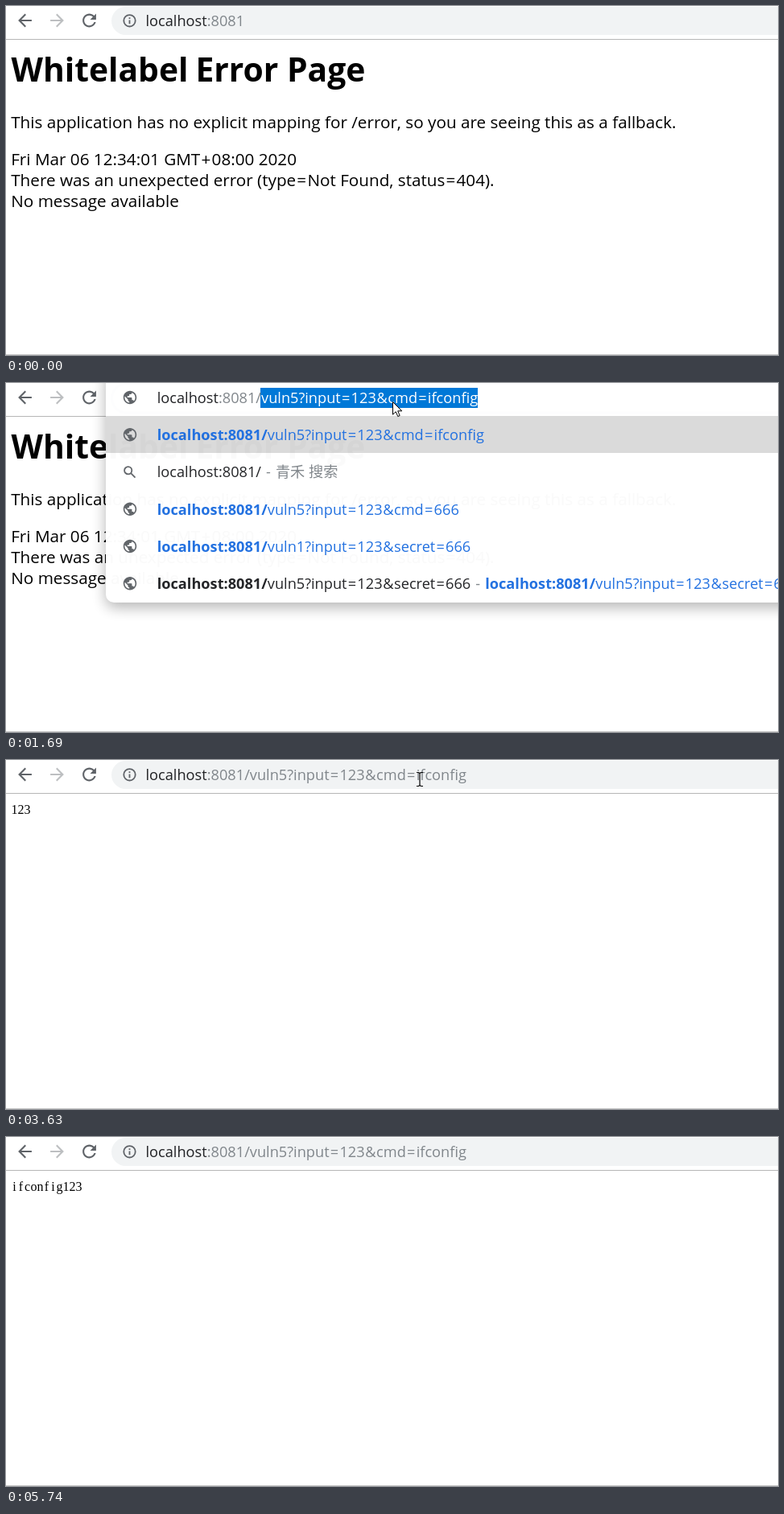
These frames come from a looping animation (959x434 px, 6430 ms). An HTML page:

```html
<!DOCTYPE html>
<html lang="en">
<head>
<meta charset="utf-8">
<title>Browser reload</title>
<style>
  html, body { margin: 0; width: 100%; height: 100%; overflow: hidden; background: #fff; }
  svg { display: block; width: 959px; height: 434px; font-family: "Open Sans", "Noto Sans CJK SC", "Noto Sans CJK", sans-serif; }
  .body { font-size: 20.68px; }
  .bar { font-size: 18.2px; }
  .plain { font: 16px "Liberation Serif", serif; text-anchor: middle; }
  .shade { filter: drop-shadow(0 6px 9px rgba(0, 0, 0, .3)); }
</style>
</head>
<body>
<svg id="stage" viewBox="0 0 959 434">
  <defs>
    <path id="back" d="M20 11H7.83l5.59-5.59L12 4l-8 8 8 8 1.41-1.41L7.83 13H20v-2z"/>
    <path id="reload" d="M17.65 6.35C16.2 4.9 14.21 4 12 4c-4.42 0-7.99 3.58-7.99 8s3.57 8 7.99 8c3.73 0 6.84-2.55 7.73-6h-2.08c-.82 2.33-3.04 4-5.65 4-3.31 0-6-2.69-6-6s2.69-6 6-6c1.66 0 3.14.69 4.22 1.78L13 11h7V4l-2.35 2.35z"/>
    <path id="stop" d="M5 5L19 19M19 5L5 19" fill="none" stroke="#5f6368" stroke-width="1.9"/>
    <path id="globe" d="M12 2C6.48 2 2 6.48 2 12s4.48 10 10 10 10-4.48 10-10S17.52 2 12 2zm-1 17.93c-3.95-.49-7-3.85-7-7.93 0-.62.08-1.21.21-1.79L9 15v1c0 1.1.9 2 2 2v1.93zm6.9-2.54c-.26-.81-1-1.39-1.9-1.39h-1v-3c0-.55-.45-1-1-1H8v-2h2c.55 0 1-.45 1-1V7h2c1.1 0 2-.9 2-2v-.41c2.93 1.19 5 4.06 5 7.41 0 2.08-.8 3.97-2.1 5.39z"/>
    <g id="info" fill="none" stroke="#5f6368" stroke-width="1.8">
      <circle r="7.2"/><path d="M0-.8V4M0-4V-2.2"/>
    </g>
    <g id="lens" fill="none" stroke="#5f6368" stroke-width="1.8">
      <circle cx="-1.8" cy="-1.8" r="4.6"/><path d="M1.6 1.6L7 7"/>
    </g>
    <path id="arrow" d="M.5.5V16.2L4.2 12.7L6.8 18.6L9.2 17.5L6.7 11.8H11.8Z" fill="#fff" stroke="#000"/>
    <path id="beam" d="M-4-8.5H-1.5L0-7.5L1.5-8.5H4M0-7.5V7.5M-4 8.5H-1.5L0 7.5L1.5 8.5H4" fill="none" stroke="#000" stroke-width="1.2"/>
    <clipPath id="below"><path d="M0 42H959V434H0Z"/></clipPath>
  </defs>
  <g id="view"></g>
</svg>
<script>
const LOOP = 6430;
const INK = '#202124', GREY = '#80868b', BLUE = '#1f6fe0', ICON = '#5f6368';
const HOST = 'localhost', PORT = ':8081', QUERY = 'vuln5?input=123&cmd=ifconfig';
const view = document.getElementById('view');

const use = (id, x, y, scale = 1, fill = ICON) =>
  `<use href="#${id}" fill="${fill}" transform="translate(${x} ${y}) scale(${scale})"/>`;
const icon = (id, x, y, scale, fill) => use(id, x - 12 * scale, y - 12 * scale, scale, fill);
const box = (x, y, w, h, fill, more = '') =>
  `<rect x="${x}" y="${y}" width="${w}" height="${h}" fill="${fill}" ${more}/>`;

// a little air around the symbols
const airy = s => s.replace(/([=+&])(.)/g, (m, sign, next) => {
  const gap = sign === '&' ? .6 : 1.2;
  return `<tspan dx="${gap}">${sign === '&' ? '&amp;' : sign}</tspan><tspan dx="${gap}">${next}</tspan>`;
});
const run = (s, fill, weight = 400) => `<tspan fill="${fill}" font-weight="${weight}">${airy(s)}</tspan>`;
const line = (cls, x, y, inner) => `<text class="${cls}" x="${x}" y="${y}">${inner}</text>`;
const dash = `<tspan dx="6" fill="${GREY}">-</tspan>`;
const finder = dash + `<tspan dx="6" fill="${GREY}">青禾 搜索</tspan>`;
const link = (tail, fill) => run(HOST + PORT + '/', fill, 700) + run(tail, fill);

function errorPage() {
  const title = [[6.5, 'Whitelabel'], [235.5, 'Error'], [349, 'Page']];
  const rows = [
    [152, 'This application has no explicit mapping for /error, so you are seeing this as a fallback.'],
    [198, 'Fri Mar 06 12:34:01 GMT+08:00 2020'],
    [224, 'There was an unexpected error (type=Not Found, status=404).'],
    [250, 'No message available']
  ];
  return title.map(([x, s]) => `<text x="${x}" y="94" font-size="40.8" font-weight="700">${s}</text>`).join('') +
    rows.map(([y, s]) => line('body', 6.2, y, airy(s))).join('');
}

const output = s => line('plain', [...s].map((c, i) => 10.5 + 8 * i).join(' '), 67, s);

function page(t) {
  if (t < 2850) return errorPage();
  if (t < 3020) return '';
  return output(t < 4870 ? '123' : 'ifconfig123');
}

function toolbar(t) {
  const loading = t >= 2780 && t < 2850 || t >= 4810 && t < 4870;
  const focus = t >= 680 && t < 2780;
  const hover = t >= 4100 && t < 5420;
  return box(0, 41, 959, 1, '#b6b6b6') + box(0, 433, 959, 1, '#c8c8c8') +
    icon('back', 23.5, 18, 1.05) +
    `<g transform="rotate(180 63.5 18)">${icon('back', 63.5, 18, 1.05, '#bdbfc1')}</g>` +
    (hover ? '<circle cx="103.5" cy="18.5" r="17.5" fill="#dfdfdf"/>' : '') +
    icon(loading ? 'stop' : 'reload', 103.5, 18, 1.05) +
    (focus
      ? box(131.5, 1, 900, 36, '#fff', 'rx="18" stroke="#aecbfa" stroke-width="2.6"')
      : box(131, 1, 900, 35, '#f1f3f4', 'rx="17.5"'));
}

function popup(t) {
  if (t < 1620 || t >= 2850) return '';
  const short = t >= 1920, closing = t >= 2780;
  const alpha = closing ? .38 : t < 1690 ? .6 : t < 1770 ? .98 : 1;
  const rows = short
    ? [run(HOST + PORT + '/' + QUERY, BLUE, 700), run(HOST + PORT + '/' + QUERY, INK) + finder]
    : [
        link(QUERY, BLUE),
        run(HOST + PORT + '/', INK) + finder,
        link('vuln5?input=123&cmd=666', BLUE),
        link('vuln1?input=123&secret=666', BLUE),
        link('vuln5?input=123&secret=666', INK) + dash + '<tspan dx="1.3"> </tspan>' + link('vuln5?input=123&secret=666', BLUE)
      ];
  const list = rows.map((inner, i) => {
    const y = 64.3 + 46.25 * i;
    return (i === 1 ? use('lens', 153.5, y) : icon('globe', 154, y, .82)) + line('bar', 187.7, y + 6.7, inner);
  }).join('');
  return `<g opacity="${alpha}"${closing ? ' clip-path="url(#below)"' : ''}>` +
    box(124, -20, 900, short ? 154 : 293, '#fff', 'rx="10" class="shade"') +
    box(124, 41, 835, 46, '#dadada') + list + '</g>';
}

function address(t) {
  const caret = x => box(x, 6, 1, 22, '#333');
  const open = t >= 1620 && t < 2780;
  if (open) {
    const picked = t < 1920;
    return icon('globe', 154, 18, .82) +
      (picked ? box(316, 6, 270, 25, '#0078d7') : '') +
      line('bar', 187.7, 25, run(HOST, INK) + run(PORT + '/', GREY) + run(QUERY, picked ? '#fff' : GREY)) +
      (!picked && t < 2470 ? caret(586) : '');
  }
  const picked = t >= 680 && t < 840;
  const tail = t >= 2780 ? PORT + '/' + QUERY : PORT;
  return use('info', 153.5, 18.3) +
    (picked ? box(174, 6, 121, 25, '#0078d7') : '') +
    line('bar', 173.5, 25, run(HOST, picked ? '#fff' : INK) + run(tail, picked ? '#fff' : GREY)) +
    (t >= 840 && t < 1370 ? caret(295) : '');
}

// pointer moves in steps of n positions between two places
function glide(t, t0, step, n, a, b, ease) {
  const k = Math.min(n - 1, Math.floor((t - t0) / step)) / (n - 1);
  const e = ease(k);
  return [a[0] + (b[0] - a[0]) * e, a[1] + (b[1] - a[1]) * e];
}

const wander = [
  [3630, 514, 24], [3710, 558, 30], [3790, 588, 34], [3870, 520, 30], [3950, 380, 22],
  [4030, 230, 14], [4100, 130, 8], [4180, 84, 10], [4250, 92, 20], [4330, 149, 24],
  [4410, 122, 12], [4480, 95, 4], [4660, 111, 1], [4810, 109, 7]
];

function pointer(t) {
  if (t < 70 || t >= 5740) return '';
  let p, text = false;
  if (t < 760) {
    p = glide(t, 70, 76.2, 9, [600, 405], [488, 28], k => 1 - (1 - k) ** 2);
    text = p[1] < 38;
  } else if (t < 1620) {
    p = glide(t, 760, 76.6, 4, [487, 27], [482, 24], k => k);
    text = true;
  } else if (t < 3630) {
    p = [480, 23];
  } else if (t < 5420) {
    p = wander.filter(w => w[0] <= t).pop().slice(1);
    text = p[0] > 131 && p[1] < 38;
  } else {
    p = glide(t, 5420, 80, 4, [170, 45], [879, 408], k => k);
  }
  return use(text ? 'beam' : 'arrow', p[0], p[1]);
}

let last = '';
function draw(now) {
  const t = now % LOOP;
  const markup = page(t) + toolbar(t) + popup(t) + address(t) + pointer(t);
  if (markup !== last) view.innerHTML = last = markup;
}

const start = performance.now();
function tick() {
  draw(performance.now() - start);
  requestAnimationFrame(tick);
}
tick();
</script>
</body>
</html>
```
